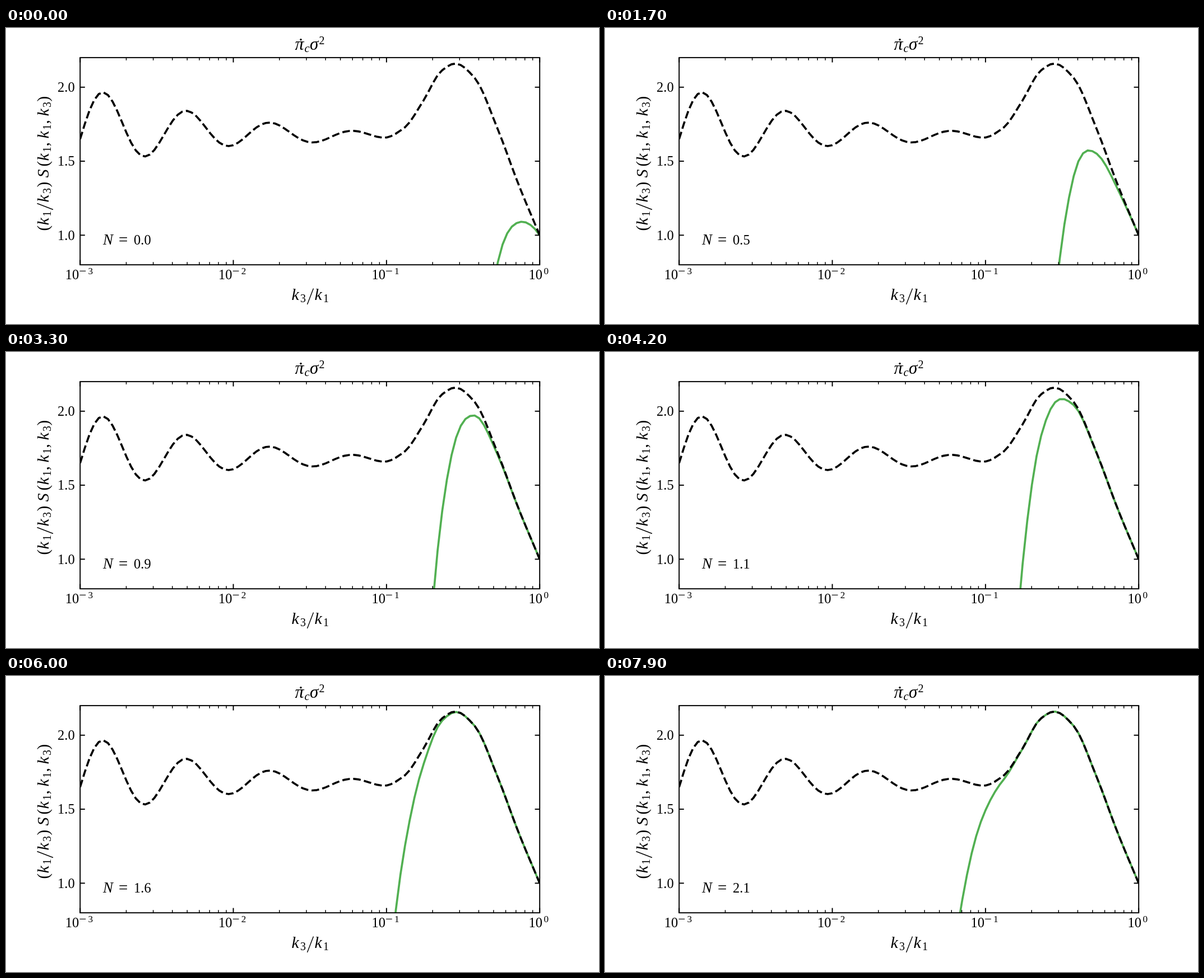
These frames come from a looping animation (1058 px wide and 529 px high, 8000 ms). An HTML page with a canvas:

```html
<!DOCTYPE html>
<html lang="en">
<head>
<meta charset="utf-8">
<title>Shape function</title>
<style>
  html, body { margin: 0; width: 100%; height: 100%; overflow: hidden; background: #fff; }
  canvas { display: block; width: 100%; height: 100%; }
</style>
</head>
<body>
<canvas id="plot"></canvas>
<script>
const W = 1058, H = 529;
const L = 132.25, R = 952.2, T = 52.9, B = 423.2;
const DECADE = (R - L) / 3, UNIT = (B - T) / 1.4;
const STEP_MS = 100, STEPS = 80, N_STEP = 0.0267;
const LINE = 3.67, STROKE = 1.96;
const TAU = 2 * Math.PI;

const canvas = document.getElementById('plot');
const ctx = canvas.getContext('2d');
const dpr = window.devicePixelRatio || 1;
canvas.width = W * dpr;
canvas.height = H * dpr;
ctx.scale(dpr, dpr);

const toY = v => B - (v - 0.8) * UNIT;
const smooth = t => { t = Math.min(1, Math.max(0, t)); return t * t * (3 - 2 * t); };

// Monotone cubic through a few points, flat at turning points
function curve(points) {
  const n = points.length, h = [], d = [], m = [0];
  for (let i = 0; i < n - 1; i++) {
    h[i] = points[i + 1][0] - points[i][0];
    d[i] = (points[i + 1][1] - points[i][1]) / h[i];
  }
  for (let i = 1; i < n - 1; i++) {
    m[i] = d[i - 1] * d[i] <= 0 ? 0 : 2 / (1 / d[i - 1] + 1 / d[i]);
  }
  m[n - 1] = d[n - 2];
  return x => {
    let i = 0;
    while (i < n - 2 && x > points[i + 1][0]) i++;
    const t = (x - points[i][0]) / h[i], s = 1 - t;
    return s * s * ((1 + 2 * t) * points[i][1] + t * h[i] * m[i]) +
           t * t * ((3 - 2 * t) * points[i + 1][1] - s * h[i] * m[i + 1]);
  };
}

// Damped ripples on a slowly falling level
function ripple(x) {
  const u = x - 172.5;
  const level = 1.717 - 0.05 * Math.pow(Math.max(0, u) / 447, 1.5);
  return toY(level + 0.25 * Math.exp(-0.0042 * u) * Math.cos(TAU * (u - 2.5) / 149.1));
}

const PEAK_START = 619;
const peak = curve([
  [PEAK_START, ripple(PEAK_START)], [675, 196], [711, 178], [744, 131], [777, 76.5],
  [802, 63.5], [836, 89], [877, 180], [915, 281], [R, toY(1)]
]);
const limit = x => x < PEAK_START ? ripple(x) : peak(x);

const grid = Array.from({ length: 100 }, (_, i) => L + (R - L) * i / 99);
const limitLine = grid.map(x => [x, limit(x)]);

// The green curve falls short of the limit by a gap that decays to the right
function growingLine(step) {
  const entry = 876.5 - 3.076 * step - 3.74e-4 * step * (step - 53) * (step - 79);
  const decay = 0.03 - 0.005 * Math.sin(TAU * (step + 2) / 71);
  const bend = 0.00008 + 0.00016 * smooth((step - 50) / 18);
  const gap = B - limit(entry);
  return grid.filter(x => x > entry - 20).map(x => {
    const u = x - entry;
    const taper = 1 - Math.pow(u / (R - entry), 4);
    return [x, limit(x) + gap * Math.exp(-decay * u - bend * u * u) * taper];
  });
}

function trace(points, color, dash) {
  ctx.strokeStyle = color;
  ctx.lineWidth = LINE;
  ctx.lineJoin = 'round';
  ctx.setLineDash(dash);
  ctx.beginPath();
  for (const [x, y] of points) ctx.lineTo(x, y);
  ctx.stroke();
  ctx.setLineDash([]);
}

function put(text, x, y, size, style = '') {
  ctx.font = `${style} ${size}px "Liberation Serif", "Noto Serif", serif`;
  ctx.fillText(text, x, y);
}
const italic = (text, x, y, size) => put(text, x, y, size, 'italic');

function segment(x1, y1, x2, y2, width) {
  ctx.lineWidth = width;
  ctx.beginPath();
  ctx.moveTo(x1, y1);
  ctx.lineTo(x2, y2);
  ctx.stroke();
}

function kSub(index, x, y) {
  italic('k', x, y, 30);
  put(index, x + 15.5, y + 4.4, 20);
}

function ratio(top, bottom, x, y) {
  kSub(top, x, y);
  segment(x + 28, y + 8, x + 39, y - 20.5, 1.4);
  kSub(bottom, x + 41, y);
}

function tickX(x, length, width) {
  segment(x, B, x, B - length, width);
  segment(x, T, x, T + length, width);
}

function drawAxes() {
  ctx.strokeStyle = ctx.fillStyle = '#000';
  ctx.lineWidth = STROKE;
  ctx.strokeRect(L, T, R - L, B - T);
  for (let e = 0; e <= 3; e++) {
    const x = L + e * DECADE;
    tickX(x, 8.6, STROKE);
    if (e < 3) {
      for (let k = 2; k < 10; k++) tickX(x + Math.log10(k) * DECADE, 4.9, 1.47);
      put('10', x - 26.5, 449, 24.5);
      put('−', x - 1.8, 441.5, 23);
      put(3 - e, x + 14.2, 440, 17.2);
    } else {
      put('10', x - 19.8, 449, 24.5);
      put('0', x + 7.4, 440, 17.2);
    }
  }
  for (const v of [1, 1.5, 2]) {
    const y = toY(v);
    segment(L, y, L + 8.6, y, STROKE);
    segment(R, y, R - 8.6, y, STROKE);
    put(v.toFixed(1), 92, y + 8.4, 24.5);
  }
}

function drawTitles() {
  italic('π', 515.5, 38.5, 32);
  ctx.beginPath();
  ctx.arc(526, 20.7, 1.8, 0, TAU);
  ctx.fill();
  italic('c', 532.5, 43, 21);
  italic('σ', 542, 38.5, 31);
  put('2', 558.5, 28.5, 20);

  ratio('3', '1', 509.5, 486);

  ctx.save();
  ctx.translate(76, 363.5);
  ctx.rotate(-Math.PI / 2);
  put('(', 1, 0, 29);
  ratio('1', '3', 11, 0);
  put(')', 79, 0, 29);
  italic('S', 96, 0, 30);
  put('(', 116, 0, 29);
  ['1', '1', '3'].forEach((index, i) => {
    const x = 126 + 40 * i;
    kSub(index, x, 0);
    put(i < 2 ? ',' : ')', x + 26, 0, 29);
  });
  ctx.restore();
}

function draw(now) {
  const step = Math.floor(now / STEP_MS) % STEPS;
  ctx.fillStyle = '#fff';
  ctx.fillRect(0, 0, W, H);

  ctx.save();
  ctx.beginPath();
  ctx.rect(L, T, R - L, B - T);
  ctx.clip();
  trace(growingLine(step), '#52b052', []);
  trace(limitLine, '#000', [LINE * 3.7, LINE * 1.6]);
  ctx.restore();

  drawAxes();
  drawTitles();
  italic('N', 173, 386.5, 27);
  put('=', 201, 388, 29);
  put((step * N_STEP).toFixed(1), 228, 386.5, 24.5);
}

const start = performance.now();
function tick() {
  draw(performance.now() - start);
  requestAnimationFrame(tick);
}
tick();
</script>
</body>
</html>
```
